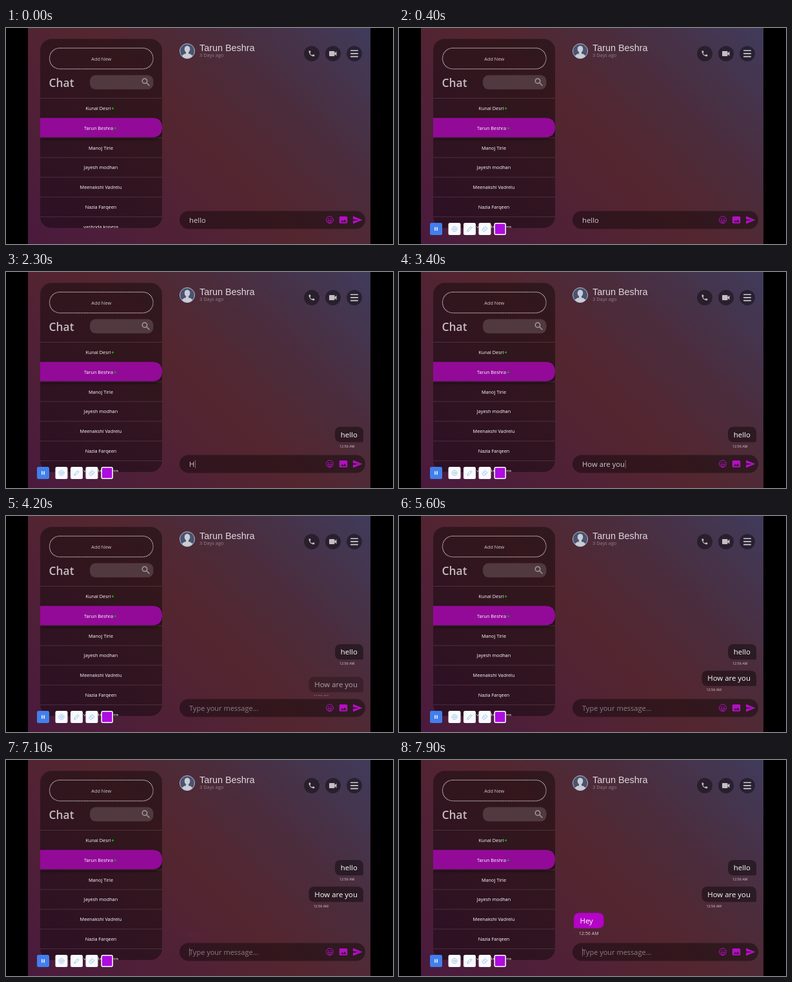
Animation of 600 by 337 pixels, one loop 8000 ms. Source, as an HTML page:

```html
<!DOCTYPE html>
<html lang="en">
<head>
<meta charset="utf-8">
<title>Chat</title>
<style>
  html, body { margin: 0; height: 100%; overflow: hidden; background: #000; }
  svg { display: block; width: 100vw; height: 100vh; }
  text { font-family: "Open Sans", "Noto Sans", sans-serif; fill: #fff; white-space: pre; }
  .mid { text-anchor: middle; }
  .shade { fill: #000; fill-opacity: .4; }
  .grey { fill: #c4bec3; }
  .pink { fill: #b40fc4; }
  .line { fill: none; stroke-linecap: round; stroke-linejoin: round; }
</style>
</head>
<body>
<svg viewBox="0 0 600 337" preserveAspectRatio="none">
  <defs>
    <linearGradient id="bg" gradientUnits="userSpaceOnUse" x1="82" y1="386" x2="516" y2="-48">
      <stop offset="0" stop-color="#4a1a3e"/>
      <stop offset=".28" stop-color="#502136"/>
      <stop offset=".5" stop-color="#54262f"/>
      <stop offset=".7" stop-color="#4b2c3b"/>
      <stop offset="1" stop-color="#403b5b"/>
    </linearGradient>
    <clipPath id="panel"><rect x="53" y="17" width="189" height="295" rx="18"/></clipPath>
    <clipPath id="log"><rect x="265" y="60" width="295" height="221"/></clipPath>
    <clipPath id="face"><circle cx="281" cy="36" r="11.500"/></clipPath>
    <filter id="soft" x="-10%" y="-40%" width="120%" height="200%"><feGaussianBlur stdDeviation="2"/></filter>
  </defs>

  <rect width="600" height="337"/>
  <rect x="34" width="531" height="337" fill="url(#bg)"/>

  <!-- contact panel -->
  <rect class="shade" x="53" y="17" width="189" height="295" rx="18"/>
  <rect x="67.500" y="31.300" width="160.500" height="32.500" rx="16" fill="none" stroke="#eee9ec" stroke-width="1.200" stroke-dasharray="1.200 1.200"/>
  <text class="mid" x="147.700" y="50.500" font-size="7.400" style="fill:#cfc8cc">Add New</text>
  <text x="66.500" y="91.700" font-size="17.400" font-weight="600" style="fill:#c4bcc0">Chat</text>
  <rect x="130" y="73.500" width="98.500" height="22.300" rx="9" fill="#fff" fill-opacity=".15"/>
  <g class="line" stroke="#a49ba0" stroke-width="1.500"><circle cx="215" cy="82.700" r="3.700"/><path d="M218 85.700l4 4"/></g>
  <g id="list" clip-path="url(#panel)"></g>

  <!-- conversation header -->
  <g clip-path="url(#face)">
    <rect x="269" y="24" width="24" height="24" fill="#4a5370"/>
    <ellipse cx="281" cy="33" rx="4.300" ry="5.300" fill="#c9cdd6"/>
    <path d="M279 36h4v4q7 1 8 9h-20q1-8 8-9z" fill="#c9cdd6"/>
  </g>
  <circle cx="281" cy="36" r="11.500" fill="none" stroke="#b7bcc7" stroke-width="1"/>
  <text x="300" y="35.700" font-size="14.400" style="font-family:'Liberation Sans',sans-serif;fill:#ded8de">Tarun Beshra</text>
  <text x="300" y="44.700" font-size="7.400" style="fill:#8f8389">3 Days ago</text>
  <g class="shade"><circle cx="474" cy="40" r="12"/><circle cx="507" cy="40" r="12"/><circle cx="540" cy="40" r="12"/></g>
  <path class="grey" transform="translate(468 34) scale(.49)" d="M6.620 10.790c1.440 2.830 3.760 5.140 6.590 6.590l2.200-2.200c.27-.27.67-.36 1.020-.24 1.120.37 2.330.57 3.570.57.55 0 1 .45 1 1V20c0 .55-.45 1-1 1-9.390 0-17-7.610-17-17 0-.55.45-1 1-1h3.500c.55 0 1 .45 1 1 0 1.250.2 2.450.57 3.570.11.35.03.74-.25 1.020z"/>
  <g class="grey"><rect x="501" y="36" width="8.500" height="8" rx="1"/><path d="M509 39.500l3.500-3v7l-3.500-3z"/></g>
  <path class="line" stroke="#d0cbd0" stroke-width="1.600" d="M534.700 35.200h10.600M534.700 39.900h10.600M534.700 44.600h10.600"/>

  <g id="chat" clip-path="url(#log)"></g>

  <!-- message field -->
  <rect class="shade" x="269" y="285.500" width="288" height="28" rx="14"/>
  <text id="field" x="284" y="304" font-size="11.300"></text>
  <rect id="caret" y="293.500" width=".8" height="12.500" fill="#cfc6cb"/>
  <g class="line" stroke="#b40fc4" stroke-width="1"><circle cx="502" cy="299.300" r="5.500"/><path d="M499 300.700q.6 2.800 3 2.800t3-2.800zM499.200 297.800h1.600M503.200 297.800h1.600"/></g>
  <rect class="pink" x="516.700" y="294" width="12.600" height="10.800" rx="1.600"/>
  <path d="M519 302.800l2.300-3 1.700 2 2.200-3 2.600 4z" fill="#351827"/>
  <path class="pink" d="M538 293.500l14.500 6-14.500 6v-4.700l9.500-1.300-9.500-1.300z"/>

  <!-- drawing tools -->
  <g id="tools">
    <rect x="48" y="304" width="19" height="19" rx="2.500" fill="#417fec"/>
    <path d="M55.900 310.700v5.600M59.100 310.700v5.600" stroke="#fff" stroke-width="1.500"/>
    <g fill="#f8fafd"><rect x="76.500" y="304" width="19" height="19" rx="2.500"/><rect x="100" y="304" width="19" height="19" rx="2.500"/><rect x="123.500" y="304" width="19" height="19" rx="2.500"/></g>
    <g class="line" stroke="#8fb8e6" stroke-width=".9">
      <circle cx="86" cy="313.500" r="4" stroke-dasharray="1.900 1.240"/><circle cx="86" cy="313.500" r="1.700"/>
      <path d="M106 317l.6-2.500 4.600-4.600 1.900 1.900-4.600 4.600z"/>
      <path d="M129 314.300l4.700-4.600 3.300 3.300-4.700 4.300h-1zM131 312.300l3.300 3.200"/>
    </g>
    <rect x="148.200" y="304.700" width="17" height="17.500" rx="2" fill="#ad0de0" stroke="#fff" stroke-width="1.500"/>
  </g>
</svg>

<script>
const $ = id => document.getElementById(id);
const LOOP = 8000, FADE = 800, RISE = 22, BLINK = 530;

// Contacts: name, centre, optional online dot
const contacts = [
  ["Kunal Desri", 143, 165.5], ["Tarun Beshra", 143.5, 169.3], ["Manoj Tirle", 147],
  ["Jayesh modhan", 147], ["Meenakshi Vadrelu", 147], ["Nazia Farqeen", 147], ["yashoda konera", 147]
];
$("list").innerHTML = contacts.map(([name, x, dot], i) => {
  const y = 109.5 + i * 30.85;
  const pill = `M53 ${y - .15}h174q15 0 15 15.150t-15 15.150h-174z`;
  return (i === 1
    ? `<path d="${pill}" transform="translate(0 2.500)" opacity=".55" filter="url(#soft)"/><path d="${pill}" fill="#930a98"/>`
    : `<path d="M53 ${y}h189" stroke="#fff" stroke-opacity=".16" stroke-width=".8"/>`)
    + `<text class="mid" x="${x}" y="${y + 18.4}" font-size="7.300">${name}</text>`
    + (dot ? `<circle cx="${dot}" cy="${y + 16}" r="1.700" fill="#0a9a18"/>` : "");
}).join("");

// Messages: shown at, text, bubble left and width, resting centres after each later one
const messages = [
  { at: 1200, text: "hello", x: 510, w: 44, tx: 517, size: 5.4, ys: [253.5, 212, 168] },
  { at: 3600, text: "How are you", x: 469.5, w: 84.5, tx: 476.5, size: 5.4, ys: [253.3, 209.5] },
  { at: 7000, text: "Hey", x: 271, w: 46.5, tx: 278.7, size: 7.1, ys: [250.5], left: true }
];
function bubble({ x, w, left }) {
  const bl = left ? 2 : 9, br = left ? 9 : 2;
  return `M${x + 9} -12h${w - 18}q9 0 9 9V${12 - br}q0 ${br} ${-br} ${br}H${x + bl}q${-bl} 0 ${-bl} ${-bl}V-3q0-9 9-9z`;
}
$("chat").innerHTML = messages.map(m => `<g>
  <path d="${bubble(m)}" ${m.left ? 'fill="#b404c6"' : 'fill-opacity=".42"'}/>
  <text x="${m.x + (m.left ? 9.5 : 8.8)}" y="4" font-size="11.400">${m.text}</text>
  <text x="${m.tx}" y="${m.left ? 22.5 : 20}" font-size="${m.size}" style="fill:#d3cbd0">12:56 AM</text></g>`).join("");
const bubbles = [...$("chat").children];

// Times at which each letter is typed and the field is cleared
const reply = "How are you";
const keys = [2200, 2400, 2500, 2600, 2800, 2900, 3000, 3100, 3100, 3200, 3400];
const clears = [650, 3600];
const shown = messages.map(m => m.at);

function draw(t) {
  $("tools").style.display = t < 300 ? "none" : "";

  messages.forEach((m, i) => {
    const p = Math.min(1, Math.max(0, (t - m.at) / FADE)) ** 2;
    const later = shown.slice(i + 1).filter(s => t >= s).length;
    bubbles[i].setAttribute("opacity", p);
    bubbles[i].setAttribute("transform", `translate(0 ${m.ys[later] + RISE * (1 - p)})`);
  });

  const typed = t < clears[0] ? "hello" : t < clears[1] ? reply.slice(0, keys.filter(k => t >= k).length) : "";
  const field = $("field");
  field.textContent = typed || "Type your message...";
  field.setAttribute("font-size", typed ? 11.3 : 11);
  field.style.fill = typed ? "#d2c9ce" : "#8b7f86";

  const last = Math.max(-BLINK, ...[...clears, ...keys].filter(k => t >= k));
  const on = Math.floor((t - last) / BLINK) % 2 === 0;
  $("caret").setAttribute("x", 284 + (typed ? field.getComputedTextLength() + .7 : 0));
  $("caret").setAttribute("opacity", on ? .6 : 0);
}

const start = performance.now();
function tick() {
  draw((performance.now() - start) % LOOP);
  requestAnimationFrame(tick);
}
tick();
</script>
</body>
</html>
```
